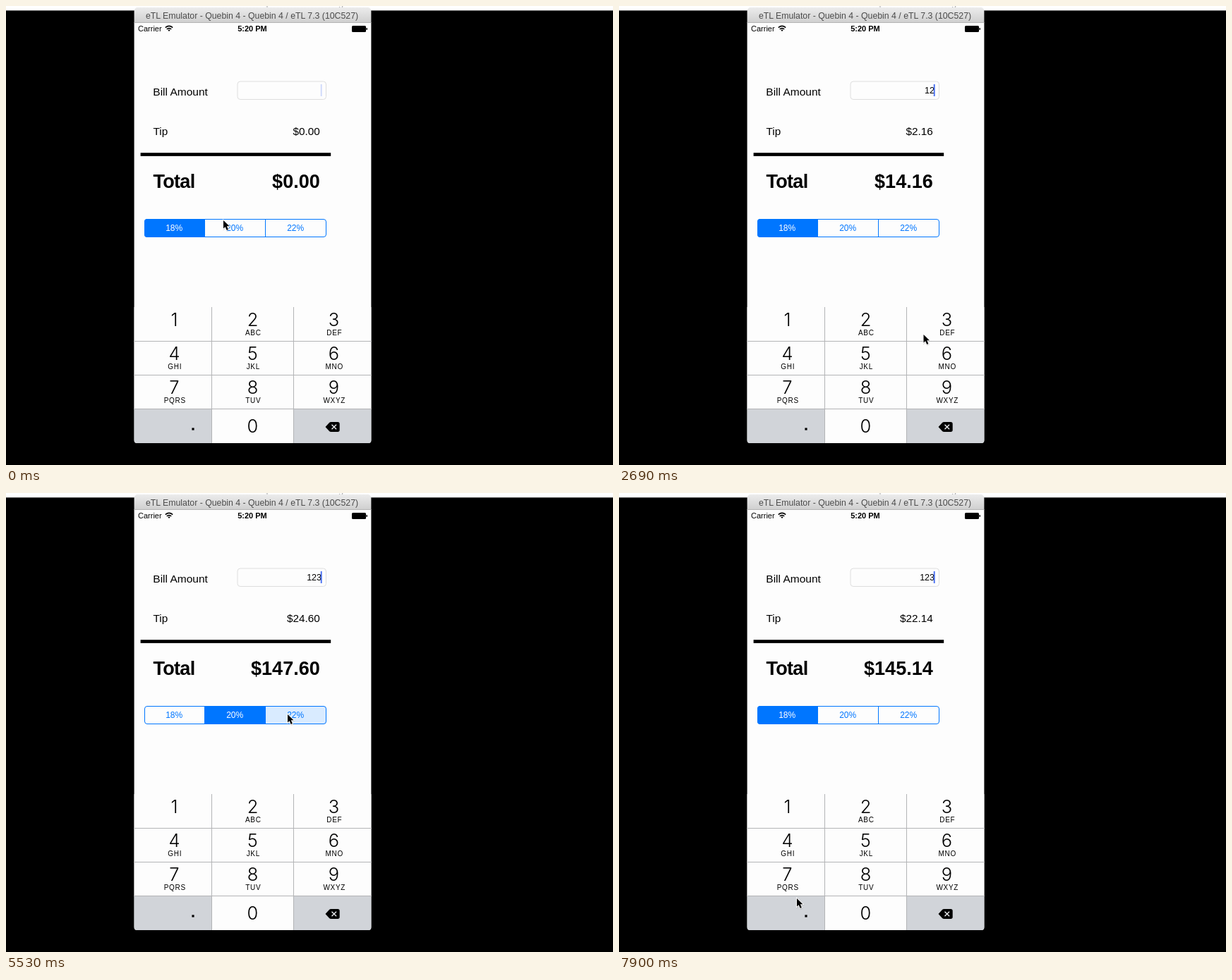
Animation of 860 by 651 pixels, one loop 8000 ms. Source, as an HTML page:

```html
<!DOCTYPE html>
<html lang="en">
<head>
<meta charset="utf-8">
<title>Tip calculator</title>
<style>
  html, body { margin: 0; width: 100%; height: 100%; overflow: hidden; background: #000; }
  svg { display: block; font: 15.3px "Liberation Sans", Arial, sans-serif; }
  .mid { text-anchor: middle; }
  .end { text-anchor: end; }
  .total { font-size: 27px; font-weight: bold; }
  .digit { font: 300 25.5px Inter, "Liberation Sans", sans-serif; }
  .letters { font-size: 10px; letter-spacing: .7px; }
  .seg { font-size: 12px; }
  .status { font-size: 11px; }
</style>
</head>
<body>
<svg width="860" height="651" viewBox="0 0 860 651">
  <defs>
    <linearGradient id="bar" x2="0" y2="1">
      <stop stop-color="#ececec"/><stop offset="1" stop-color="#d0d0d0"/>
    </linearGradient>
    <clipPath id="segClip"><rect x="196" y="302" width="258" height="26" rx="4"/></clipPath>
    <clipPath id="phone"><path d="M181.6 23H517.4V616a4 4 0 0 1-4 4H185.6a4 4 0 0 1-4-4Z"/></clipPath>
    <path id="arrow" d="M0 0V13.2L3 10.4 5.4 15.8 7.8 14.8 5.5 9.5H9.6Z"/>
  </defs>

  <rect width="860" height="6.4" fill="#fff"/>
  <text x="362" y="0" font-size="13" fill="#aaa">tip demo walkthrough</text>

  <path d="M181.6 23V7a5 5 0 0 1 5-5H512.4a5 5 0 0 1 5 5V23Z" fill="url(#bar)"/>
  <text class="mid" x="348.5" y="18" font-size="12.3" fill="#4c4c4c">eTL Emulator - Quebin 4 - Quebin 4 / eTL 7.3 (10C527)</text>
  <g clip-path="url(#phone)">
    <rect x="181" y="23" width="337" height="597" fill="#fdfdfd"/>
    <path d="M181 23.5H518" stroke="#b4b4b4"/>
    <g id="keys"></g>
    <path d="M291.5 427V620M407.5 427V620M181 475.5H518M181 523.5H518M181 571.5H518" stroke="#b3b4b6" fill="none"/>
  </g>

  <text class="status" x="187" y="36.3">Carrier</text>
  <g fill="none" stroke="#000" stroke-width="1.6">
    <path d="M225.8 30.6Q231 26.2 236.2 30.6M227.8 32.9Q231 30.2 234.2 32.9"/>
    <path d="M229.4 34.2Q231 33 232.6 34.2L231 36Z" fill="#000" stroke="none"/>
  </g>
  <text class="status mid" x="349" y="36.3" font-weight="bold">5:20 PM</text>
  <rect x="490" y="28" width="20" height="9" rx="1.5"/>
  <rect x="510.4" y="31" width="1.6" height="3" rx=".8"/>

  <text x="208.3" y="127" font-size="15.5">Bill Amount</text>
  <rect x="328" y="107" width="125.5" height="25.5" rx="4" fill="#fdfdfd" stroke="#dedede"/>
  <text id="bill" class="end" x="447" y="124" font-size="12.5"></text>
  <rect id="caret" x="445.8" y="111" width="1.8" height="17" fill="#426bf2"/>
  <text x="208.5" y="183.3">Tip</text>
  <text id="tip" class="end" x="444.7" y="183.3"></text>
  <rect x="190.6" y="208.2" width="269.6" height="4.7"/>
  <text class="total" x="208.5" y="257.5" letter-spacing="-.7">Total</text>
  <text id="total" class="total end" x="444.7" y="257.5"></text>

  <g id="segs" clip-path="url(#segClip)"></g>
  <path d="M281.5 302V328M367.5 302V328" stroke="#0076ff"/>
  <rect x="196.5" y="302.5" width="257" height="25" rx="3.5" fill="none" stroke="#0076ff"/>

  <rect x="263.4" y="598.4" width="3.2" height="3.2"/>
  <path d="M452.5 597L458 591Q459 590 460.5 590H470Q472.7 590 472.7 592.7V601.3Q472.7 604 470 604H460.5Q459 604 458 603Z"/>
  <path d="M461.5 593.7l6.6 6.6m0-6.6l-6.6 6.6" stroke="#e8eaed" stroke-width="1.4"/>

  <g id="cursor">
    <g transform="scale(.88)">
      <use href="#arrow" x=".5" y="1" stroke="#000" stroke-width="2" opacity=".15"/>
      <use href="#arrow" stroke="#fff" stroke-width="2" paint-order="stroke"/>
    </g>
  </g>
</svg>
<script>
const $ = id => document.getElementById(id);
const LOOP = 8000, TICK = 149.15, BLINK = 1030;
const WHITE = '#fdfdfd', GRAY = '#d1d4d9', BLUE = '#0076ff', TINT = '#d9ebff';

const path = [
  [0, 308, 304], [7, 245, 452], [9, 245, 452], [13, 321, 450], [15, 321, 450],
  [18, 431.5, 466], [21, 438, 462], [23, 438, 462], [28, 343.5, 318], [31, 343.5, 318],
  [35, 399, 314], [38, 399, 314], [42, 241, 309], [45, 241, 309], [51, 400, 512], [53, 252, 575]
];
const typed = [[9, '1'], [15, '12'], [23, '123']];
const picked = [[0, 0], [31, 1], [38, 2], [45, 0]];
const rates = [18, 20, 22];

// Keypad
const colX = [181, 292, 408, 518], mids = [238.5, 349.5, 464.5];
const letters = ['', 'ABC', 'DEF', 'GHI', 'JKL', 'MNO', 'PQRS', 'TUV', 'WXYZ'];
let keys = '';
for (let i = 0; i < 12; i++) {
  const c = i % 3, y = 427 + 48 * (i / 3 | 0), last = i > 8;
  const digit = last ? (c === 1 ? 0 : '') : i + 1;
  keys += `<rect x="${colX[c]}" y="${y}" width="${colX[c + 1] - colX[c]}" height="49" fill="${last && c !== 1 ? GRAY : WHITE}"/>
    <text class="digit mid" x="${mids[c]}" y="${y + (last ? 34 : 27)}">${digit}</text>
    <text class="letters mid" x="${mids[c] + .8}" y="${y + 40}">${letters[i] || ''}</text>`;
}
$('keys').innerHTML = keys;
const keyRects = $('keys').querySelectorAll('rect');

$('segs').innerHTML = rates.map((r, i) =>
  `<rect x="${196 + 86 * i}" y="302" width="86" height="26"/>
   <text class="seg mid" x="${238.2 + 86 * i}" y="319.4">${r}%</text>`).join('');
const segRects = $('segs').querySelectorAll('rect'), segTexts = $('segs').querySelectorAll('text');

const clamp = v => Math.max(0, Math.min(1, v));
const latest = (list, k, none) => list.reduce((v, e) => k >= e[0] ? e : v, none);

function cursorAt(k) {
  const i = Math.max(1, path.findIndex(p => p[0] >= k));
  const [a, ax, ay] = path[i - 1], [b, bx, by] = path[i];
  const u = clamp((k - a) / (b - a)), e = u * u * (3 - 2 * u);
  return [ax + (bx - ax) * e, ay + (by - ay) * e];
}

// The caret restarts its blink with every key typed.
function caretAlpha(age) {
  if (age < BLINK / 2) return 1;
  const phase = age / BLINK % 1;
  return Math.min(clamp(phase / .025), clamp((.605 - phase) * 10));
}

function draw(t) {
  const k = Math.min(53, Math.floor((t + 8) / TICK));
  const [since, bill] = latest(typed, k, [-4, '']);
  const sel = latest(picked, k)[1];
  const tip = bill * rates[sel] / 100;

  $('bill').textContent = bill;
  $('tip').textContent = '$' + tip.toFixed(2);
  $('total').textContent = '$' + (+bill + tip).toFixed(2);
  $('caret').setAttribute('opacity', caretAlpha((k - since) * TICK));
  $('cursor').setAttribute('transform', `translate(${cursorAt(k)})`);

  // A key or segment shows as held for one tick before it takes effect.
  typed.forEach(([at], i) => keyRects[i].setAttribute('fill', k === at - 1 ? GRAY : WHITE));
  const next = picked.find(p => p[0] === k + 1);
  rates.forEach((_, i) => {
    const held = next && next[1] === i;
    segRects[i].setAttribute('fill', i === sel ? BLUE : held ? TINT : WHITE);
    segTexts[i].setAttribute('fill', i === sel ? '#fff' : BLUE);
  });
}

const start = performance.now();
function loop(now) {
  draw(Math.max(0, now - start) % LOOP);
  requestAnimationFrame(loop);
}
// reduce() starts from undefined, so the first entry of each list covers tick 0.
draw(0);
requestAnimationFrame(loop);
</script>
</body>
</html>
```
